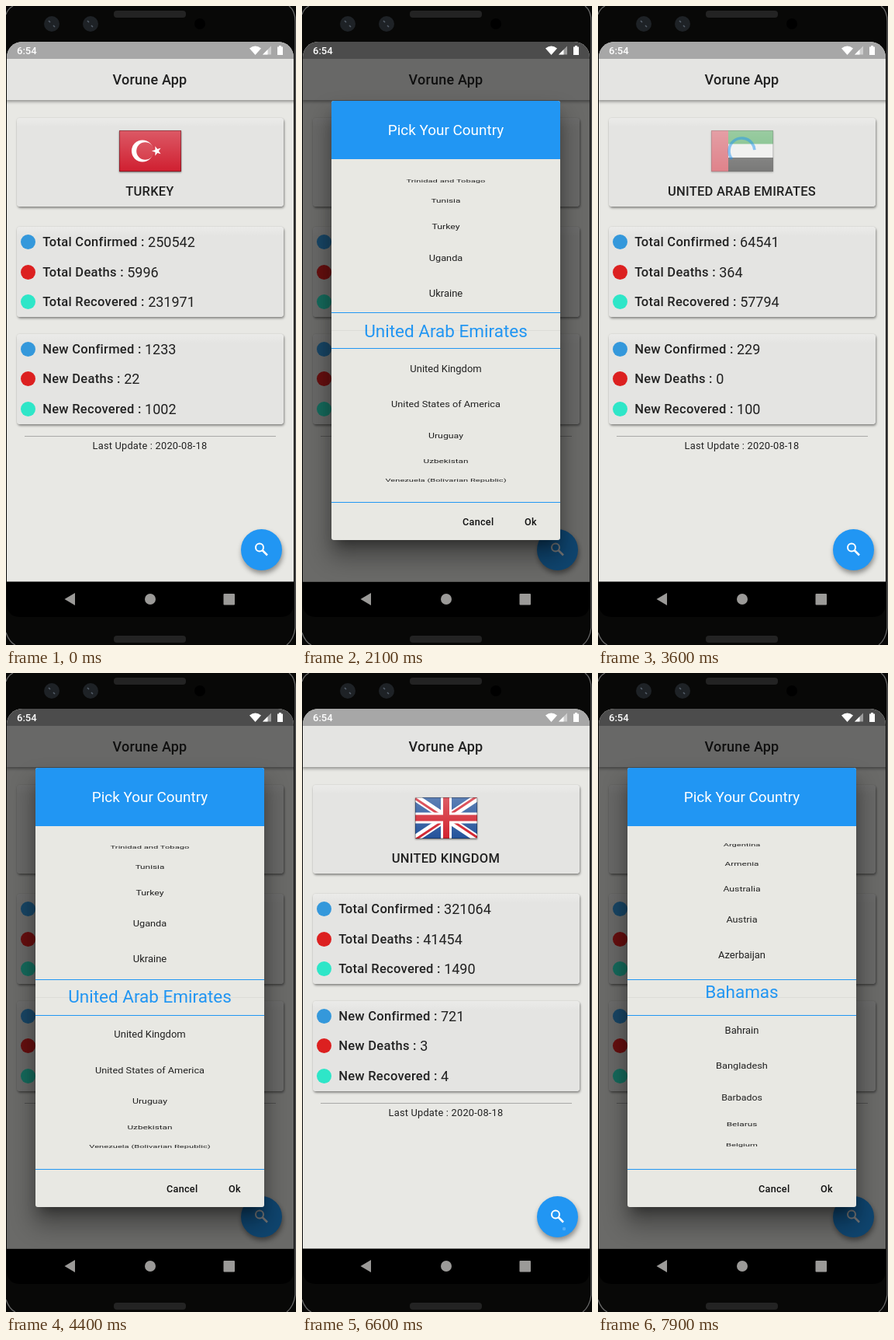
An HTML page that plays this animation: 374x822 px, repeating every 8 s.

```html
<!DOCTYPE html>
<html lang="en">
<head>
<meta charset="utf-8">
<title>Vorune App</title>
<style>
html, body { margin: 0; width: 100%; height: 100%; overflow: hidden; background: #080807; }
body { position: relative; font-family: Roboto, sans-serif; color: #212121; }
div, svg { position: absolute; }
svg { left: 0; top: 0; overflow: visible; }
.full { left: 0; top: 0; width: 374px; height: 822px; }
.text { white-space: nowrap; line-height: 24px; height: 24px; margin-top: -12px; }
.mid { left: 0; width: 371px; text-align: center; }
.medium { font-weight: 500; }

#screen { background: #e8e8e4; clip-path: inset(46px 3px 81.5px 1px round 20px 20px 0 0); }
#status { top: 46px; width: 374px; height: 22px; background: #a7a7a7; }
#bar { top: 68px; width: 374px; height: 53px; background: #e4e4e2; box-shadow: 0 2px 4px #0006; }
.card { left: 13.5px; width: 344px; height: 116px; border-radius: 4px;
  background: linear-gradient(#ebebe9, #e4e4e2 12px); box-shadow: 1px 2px 3px #0006, 0 0 2px #0002; }
.row { left: 5px; height: 20px; display: flex; align-items: center; white-space: nowrap; }
.row i { width: 19px; height: 19px; border-radius: 50%; margin-right: 9.7px; }
.row span { font: 500 16.5px Roboto, sans-serif; letter-spacing: .28px; white-space: pre; }
.row em { font: 18px Roboto, sans-serif; }
#name { font-size: 16.5px; letter-spacing: .25px; }
#flag { left: 146px; top: 160px; overflow: hidden; box-shadow: 0 1px 2px #0008; }
#spinner { left: -20px; top: -20px; }
#fab { left: 302.5px; top: 672.5px; width: 53px; height: 53px; border-radius: 50%; background: #2196f3;
  box-shadow: 1px 4px 6px #0006; }

#scrim { background: #000; }
#dialog { left: 38px; top: 122px; width: 295px; height: 565px; border-radius: 3px; background: #e8e8e3;
  box-shadow: 0 11px 15px -7px #0006, 0 20px 30px 3px #0005; }
#head { width: 295px; height: 75px; border-radius: 3px 3px 0 0; background: #2196f3; }
#head .text { top: 38px; width: 295px; text-align: center; color: #fff; font-size: 18.9px; }
#wheel { top: 75px; width: 295px; height: 441px; overflow: hidden; border-bottom: 1px solid #2196f3; }
#band { top: 197px; width: 295px; height: 45px; overflow: hidden; background: #e8e8e3;
  border: solid #2196f3; border-width: 1px 0; }
#band::after { content: ""; position: absolute; top: 22px; width: 295px; height: 1px; background: #0000000d; }
#wheel .text { width: 295px; text-align: center; font-size: 13.1px; }
#band .text { color: #2196f3; font-size: 22.5px; }
#press { left: 228px; top: 524px; width: 60px; height: 34px; border-radius: 2px; background: #00000012; }
#dialog > .text { top: 541.5px; font-size: 12.6px; letter-spacing: .3px; color: #111; }
</style>
</head>
<body>
<svg class="full" fill="none">
  <path d="M9 0Q2 4 0 11M365 0Q373 6 373 20V800Q371 815 362 822M0 806Q4 818 12 822" stroke="#686868" stroke-width="1.3"/>
  <path d="M1 740H371V768Q371 786 353 786H19Q1 786 1 768Z" fill="#000"/>
  <g fill="#232323"><rect x="139" y="6" width="93" height="9" rx="4"/><rect x="139" y="810" width="93" height="9" rx="4"/></g>
  <g fill="#1e2226"><circle cx="59" cy="23" r="10"/><circle cx="109" cy="23" r="10"/></g>
  <path d="M55 19L57 21M61 25L63 27M105 19L107 21M110 25L112 27" stroke="#56606b" stroke-width="1.5"/>
  <circle cx="250" cy="23" r="7" fill="#000"/>
  <g fill="#9b9a98"><path d="M75.500 763L89 755V771Z"/><circle cx="186" cy="763" r="7"/><rect x="280.500" y="756" width="14.500" height="14.500" rx="1"/></g>
</svg>

<div id="screen" class="full">
  <div id="bar"></div>
  <div id="status"></div>
  <div class="text mid medium" style="top:95px;font-size:18px;letter-spacing:.2px">Vorune App</div>
  <div id="top" class="card" style="top:143.5px"></div>
  <svg id="flag" width="80" height="53">
    <linearGradient id="gloss" x2="0" y2="1">
      <stop stop-color="#fff" stop-opacity=".26"/><stop offset="1" stop-color="#fff" stop-opacity="0"/>
    </linearGradient>
    <g>
      <path fill="#d01f30" d="M0 0H80V53H0Z"/>
      <circle cx="30" cy="26.500" r="14" fill="#fff"/><circle cx="33.500" cy="26.500" r="11.300" fill="#d4303f"/>
      <path fill="#fff" d="M42 26.500L46.400 25V20.300L49.200 24.100L53.600 22.700L50.900 26.500L53.600 30.300L49.200 28.900L46.400 32.700V28Z"/>
    </g>
    <g>
      <path fill="#fff" d="M0 0H80V53H0Z"/><path fill="#159a2c" d="M22 0H80V17.500H22Z"/>
      <path fill="#111" d="M22 35H80V53H22Z"/><path fill="#dc2336" d="M0 0H22V53H0Z"/>
    </g>
    <g>
      <path fill="#24539b" d="M0 0H80V53H0Z"/>
      <path stroke="#fff" stroke-width="9.500" d="M0 0L80 53M80 0L0 53"/>
      <path stroke="#d2232f" stroke-width="3" d="M0 1.500L40 28M80 51.500L40 25M80 -1.500L40 25M0 54.500L40 28"/>
      <path stroke="#fff" stroke-width="14" d="M40 0V53M0 26.500H80"/>
      <path stroke="#d2232f" stroke-width="8" d="M40 0V53M0 26.500H80"/>
    </g>
    <path fill="url(#gloss)" stroke="#000" stroke-opacity=".3" stroke-width="2" d="M0 0H80V53H0Z"/>
  </svg>
  <svg id="spinner" width="40" height="40" viewBox="-20 -20 40 40">
    <circle r="16.500" fill="none" stroke="#2196f3" stroke-width="3.600" pathLength="360"/>
  </svg>
  <div id="page" class="full">
    <div id="name" class="text mid medium" style="top:239px"></div>
    <div class="card" style="top:284px"></div>
    <div class="card" style="top:421.500px"></div>
    <div style="left:24px;top:553px;width:324px;height:1px;background:#a9a9a7"></div>
    <div class="text mid" style="top:566px;font-size:12.8px;letter-spacing:.22px">Last Update : 2020-08-18</div>
  </div>
  <div id="fab">
    <svg width="53" height="53" style="overflow:hidden;border-radius:50%">
      <circle id="wave" cx="35" cy="42" fill="#fff"/>
      <g fill="none" stroke="#fff" stroke-width="2"><circle cx="24" cy="23.500" r="5"/><path stroke-width="2.500" d="M27.500 27L34 33.500"/></g>
    </svg>
  </div>
  <div id="scrim" class="full"></div>
  <div id="dialog">
    <div id="head"><div class="text">Pick Your Country</div></div>
    <div id="wheel"><div id="band"></div></div>
    <div id="press"></div>
    <div class="text medium" style="left:169px">Cancel</div>
    <div class="text medium" style="left:249px">Ok</div>
  </div>
</div>

<svg class="full" fill="#fff">
  <path d="M314 54.500Q321.500 48.500 329 54.500L321.500 63Z"/>
  <path opacity=".45" d="M342 51.500V62.500H331Z"/><path d="M337.500 56V62.500H331Z"/>
  <path d="M350 52.500H352V51H355V52.500H357V63H350Z"/>
</svg>
<div class="text medium" style="left:14px;top:57.500px;font-size:13px;color:#fff">6:54</div>

<script>
const LOOP = 8000;
const $ = id => document.getElementById(id);
const clamp = p => Math.min(1, Math.max(0, p));
const ramp = (t, start, length) => clamp((t - start) / length);
const smooth = p => (p = clamp(p), p * p * (3 - 2 * p));
const settle = p => 1 - (1 - p) ** 2.4;

// Each country's data arrives at `from`; its flag fades in at `loaded`.
const countries = [
  { name: 'TURKEY', values: [250542, 5996, 231971, 1233, 22, 1002], from: 0, loaded: -500, fade: 400 },
  { name: 'UNITED ARAB EMIRATES', values: [64541, 364, 57794, 229, 0, 100], from: 2740, loaded: 3400, fade: 400 },
  { name: 'UNITED KINGDOM', values: [321064, 41454, 1490, 721, 3, 4], from: 5640, loaded: 5760, fade: 240 },
];
const names = ('Thailand,Timor-Leste,Togo,Trinidad and Tobago,Tunisia,Turkey,Uganda,Ukraine,United Arab Emirates,' +
  'United Kingdom,United States of America,Uruguay,Uzbekistan,Venezuela (Bolivarian Republic),Viet Nam,Yemen,' +
  'Zambia,Zimbabwe,Afghanistan,Albania,Algeria,Andorra,Angola,Antigua and Barbuda,Argentina,Armenia,Australia,' +
  'Austria,Azerbaijan,Bahamas,Bahrain,Bangladesh,Barbados,Belarus,Belgium').split(',');
const taps = [500, 4000, 6600];
const confirms = [2700, 5600];

const colors = ['#3498db', '#dc2020', '#2ee6c8'];
const cards = $('page').querySelectorAll('.card');
['Total', 'New'].forEach((kind, c) => ['Confirmed', 'Deaths', 'Recovered'].forEach((what, r) =>
  cards[c].insertAdjacentHTML('beforeend', `<div class="row" style="top:${9.6 + r * 38.6}px">
    <i style="background:${colors[r]}"></i><span>${kind} ${what} : </span><em></em></div>`)));
const values = document.querySelectorAll('.row em');
const flags = $('flag').querySelectorAll('g');
const arc = $('spinner').querySelector('circle');

function addItem(parent, name, first) {
  const item = document.createElement('div');
  item.className = 'text';
  item.textContent = name;
  first ? parent.prepend(item) : parent.append(item);
  return item;
}
const items = names.map(name => addItem($('wheel'), name, true));
const zoomed = names.map(name => addItem($('band'), name));

function scrollAt(t) {
  return 5 + 2.75 * smooth((t - 1155) / 345) + .25 * settle(ramp(t, 1860, 440))
    + settle(ramp(t, 4640, 860)) + 20.12 * settle(ramp(t, 7060, 840));
}

// Places an item on a cylinder seen in perspective.
function place(item, k, centre, reach) {
  item.style.display = Math.abs(k) < reach ? '' : 'none';
  const step = 8 * Math.PI / 180, radius = 351, depth = .73;
  const sin = Math.sin(k * step), cos = Math.cos(k * step);
  const w = 1 + depth * (1 - cos);
  const flat = (cos * w - depth * sin * sin) / (w * w);
  item.style.transform = `translateY(${centre + radius * sin / w}px) scale(${1 / w}, ${flat})`;
}

let shown;
function showCountry(country) {
  if (shown === country) return;
  shown = country;
  $('name').textContent = country.name;
  country.values.forEach((v, i) => values[i].textContent = v);
  flags.forEach((g, i) => g.style.display = countries[i] === country ? '' : 'none');
}

function drawSpinner(t, country, loading, visibility) {
  const u = ((t - country.from) / 1333) % 1;
  const tail = smooth(2 * u - 1);
  const sweep = 270 * (smooth(2 * u) - tail);
  const start = 310 * u - 25 + 270 * tail - 90;
  $('spinner').style.opacity = visibility;
  $('spinner').style.transform = `translate(185.5px, ${loading ? 161.5 : 186.5}px)`;
  arc.setAttribute('transform', `rotate(${start})`);
  arc.setAttribute('stroke-dasharray', `${sweep} 360`);
}

function draw(t) {
  const country = countries.findLast(c => t >= c.from);
  const loading = t < country.loaded;
  const flag = ramp(t, country.loaded, country.fade);
  showCountry(country);
  $('top').style.height = (loading ? 64 : 114.5) + 'px';
  $('page').style.transform = loading ? 'translateY(-50.5px)' : '';
  $('flag').style.opacity = flag;
  drawSpinner(t, country, loading, 1 - flag);

  const open = ramp(t, 580, 200) - ramp(t, 2780, 200) + ramp(t, 4130, 230)
    - ramp(t, 5680, 200) + ramp(t, 6680, 200);
  $('scrim').style.opacity = .54 * open;
  $('dialog').style.opacity = open ** 1.25;
  $('press').style.opacity = confirms.some(c => t >= c && t < c + 400) ? 1 : 0;

  const age = Math.min(...taps.map(tap => t >= tap ? t - tap : LOOP));
  $('wave').setAttribute('r', 2 + 50 * clamp(age / 250));
  $('wave').style.opacity = .22 * (1 - clamp(age / 350));

  const scroll = scrollAt(t);
  names.forEach((_, i) => {
    place(items[i], i - scroll, 220, 5.5);
    place(zoomed[i], i - scroll, 21, 1.2);
  });
}

function frame() {
  draw(performance.now() % LOOP);
  requestAnimationFrame(frame);
}
frame();
</script>
</body>
</html>
```
